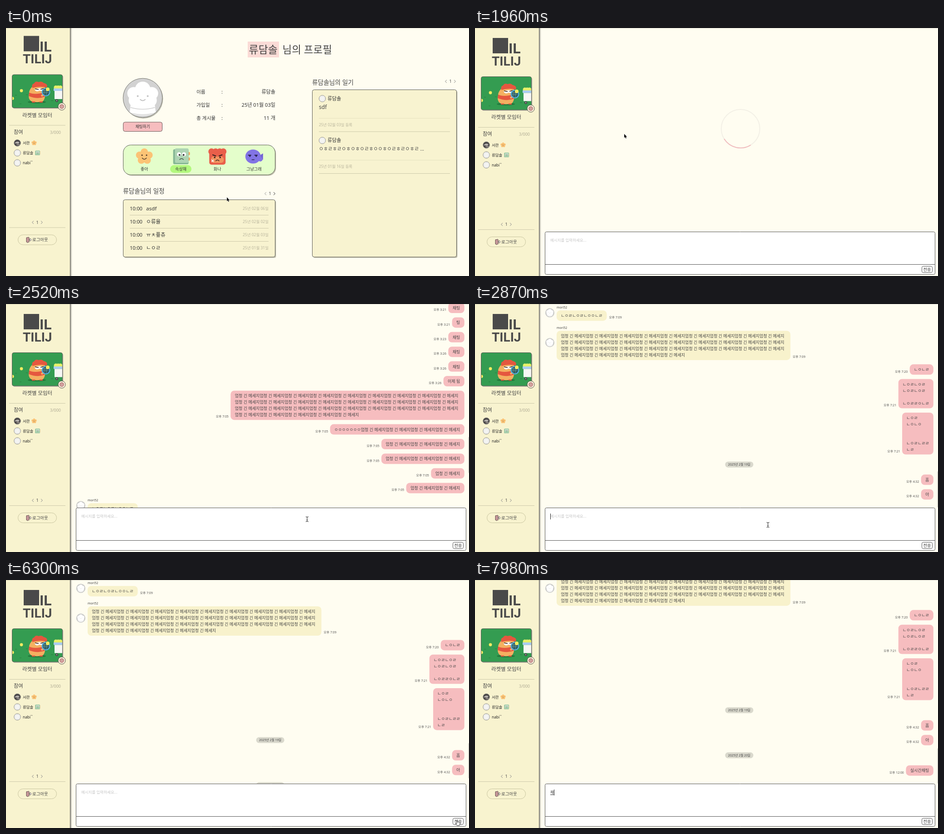
An HTML page with a canvas for the animation above (8000 ms loop, 1021 px wide and 548 px high).

```html
<!DOCTYPE html>
<html lang="ko">
<head>
<meta charset="utf-8">
<title>프로필과 채팅</title>
<style>
html, body { margin: 0; width: 100%; height: 100%; overflow: hidden; background: #fffdf1; }
canvas { display: block; }
</style>
</head>
<body>
<canvas id="stage" width="1021" height="548"></canvas>
<script>
const ctx = document.getElementById('stage').getContext('2d');
const LOOP = 8000, STEP = 70;
const FONT = '"Noto Sans","Noto Sans CJK KR","Noto Sans KR",sans-serif';
const BG = '#fffdf1', CREAM = '#f8f3d0', PINK = '#f6bdbf', INK = '#444', DIM = '#b9b59c', RULE = '#cdc9aa';
const OWNER = '류담솔', FRIEND = '서란', GUEST = 'nabi``', WRITER = 'mori52';

// ---------- helpers ----------
function text(s, x, cy, size, color = INK, align = 'left', weight = 400) {
  ctx.font = `${weight} ${size}px ${FONT}`;
  ctx.textAlign = align;
  ctx.fillStyle = color;
  ctx.fillText(s, x, cy + size * 0.36);
}
function width(s, size) {
  ctx.font = `400 ${size}px ${FONT}`;
  return ctx.measureText(s).width;
}
function paint(fill, stroke, lw = 1) {
  if (fill) { ctx.fillStyle = fill; ctx.fill(); }
  if (stroke) { ctx.strokeStyle = stroke; ctx.lineWidth = lw; ctx.stroke(); }
}
function box(x, y, w, h, r, fill, stroke) {
  ctx.beginPath();
  ctx.roundRect(x, y, w, h, r);
  paint(fill, stroke);
}
function panel(x, y, w, h, r, fill) {
  box(x + 2, y + 2, w, h, r, '#c3c1ae');
  box(x, y, w, h, r, fill, '#5c5c58');
}
function oval(x, y, rx, ry, fill, stroke, lw) {
  ctx.beginPath();
  ctx.ellipse(x, y, rx, ry, 0, 0, Math.PI * 2);
  paint(fill, stroke, lw);
}
const disc = (x, y, r, fill, stroke, lw) => oval(x, y, r, r, fill, stroke, lw);
function shape(d, fill, stroke, lw = 1) {
  const p = new Path2D(d);
  if (fill) { ctx.fillStyle = fill; ctx.fill(p); }
  if (stroke) { ctx.strokeStyle = stroke; ctx.lineWidth = lw; ctx.stroke(p); }
}
function rule(x1, x2, y, color = RULE) {
  ctx.fillStyle = color;
  ctx.fillRect(x1, y - 0.5, x2 - x1, 1);
}
function at(x, y, k, draw) {
  ctx.save();
  ctx.translate(x, y);
  ctx.scale(k, k);
  draw();
  ctx.restore();
}
function pager(x, y, prev, next) {
  shape(`M${x - 8} ${y - 3.2}l-3.5 3.2l3.5 3.2`, null, prev);
  shape(`M${x + 8} ${y - 3.2}l3.5 3.2l-3.5 3.2`, null, next);
  text('1', x, y, 9, INK, 'center');
}
const easeInOut = p => 0.5 - 0.5 * Math.cos(Math.PI * Math.min(1, Math.max(0, p)));

// ---------- small illustrations ----------
function star() {
  for (let i = 0; i < 5; i++) {
    const a = -Math.PI / 2 + i * Math.PI * 0.4;
    disc(Math.cos(a) * 11, Math.sin(a) * 10, 8, '#fbc375');
  }
  disc(0, 0, 11, '#fbc375');
  disc(-5, -3, 1.6, '#4a3526');
  disc(5, -3, 1.6, '#4a3526');
  shape('M-5 3q5 6 10 0', null, '#4a3526', 1.3);
}
function book() {
  box(14, -10, 6, 7, 2, '#f2a55c');
  box(14, 2, 6, 7, 2, '#f2a55c');
  box(-17, -16, 34, 33, 3, '#86b795');
  box(-13, -18, 30, 32, 3, '#aed4b3');
  disc(-4, -5, 4.5, '#fff');
  disc(7, -5, 4.5, '#fff');
  disc(-3, -3.5, 2, '#333');
  disc(6, -3.5, 2, '#333');
  shape('M-3 7q4.5 -5 9 0', null, '#3d4b40', 1.4);
}
function angry() {
  for (const x of [-13, -4, 5, 13]) disc(x, -11, 7, '#e95f4a');
  box(-18, -12, 36, 30, 5, '#e95f4a');
  box(-14, 0, 28, 14, 6, '#f2935f');
  shape('M-11 -4l8 3M11 -4l-8 3', null, '#33241f', 2);
  disc(-6, 2, 1.8, '#33241f');
  disc(6, 2, 1.8, '#33241f');
  shape('M-4 10q4 -5 8 0', null, '#33241f', 1.4);
  shape('M-13 7l5 5m0 -5l-5 5', null, '#fff', 1.4);
}
function blob() {
  shape('M12 -2l8 -5v14l-8 -3z', '#7264d4');
  oval(-2, 0, 17, 15.5, '#8274e4');
  disc(14, 6, 5, '#8274e4');
  shape('M-13 -3h7M1 -3h7', null, '#2b2550', 2);
  disc(-9, -1, 1.8, '#2b2550');
  disc(5, -1, 1.8, '#2b2550');
  shape('M-5 7h6', null, '#2b2550', 1.4);
}
function chef(x, y, r) {
  at(x, y, r / 43.5, () => {
    ctx.save();
    ctx.beginPath();
    ctx.arc(0, 0, 43.5, 0, Math.PI * 2);
    ctx.clip();
    ctx.fillStyle = '#d2d2d2';
    ctx.fillRect(-44, -44, 88, 88);
    for (const [cx, cy, cr] of [[-20, -10, 14], [0, -19, 17], [20, -10, 14], [-15, 5, 16], [15, 5, 16], [0, 2, 20]])
      disc(cx, cy, cr, '#fff');
    shape('M-26 10L26 10L29 34Q0 44 -29 34Z', '#fff');
    shape('M-27 21Q0 29 27 21M-29 33Q0 41 29 33', null, '#d0d0d0', 1.5);
    disc(-11, -4, 2, '#c4c4c4');
    disc(11, -4, 2, '#c4c4c4');
    shape('M-6 3q6 6 12 0', null, '#c4c4c4', 2);
    ctx.restore();
  });
}
function blankFace(x, y) {
  disc(x, y, 7.2, '#fff', '#8b8b86');
  disc(x, y, 5.2, '#f4f4f2', '#dcdcdc', 0.8);
}
function clubPicture() {
  panel(13.5, 107.5, 111, 73.5, 4, '#349c51');
  ctx.save();
  ctx.beginPath();
  ctx.roundRect(14, 108, 110, 72.5, 3.5);
  ctx.clip();
  oval(68, 168, 20, 3, '#23793c');
  shape('M20 153h4M30 172h4M44 152h4M99 165h5', null, '#27823f', 1.2);
  disc(34, 143, 3.4, '#f4ec62');
  disc(14, 160, 3.6, '#f4ec62');
  // player
  shape('M58 134Q50 142 51 150Q48 160 55 166Q68 171 82 166Q88 158 85 148Q90 140 84 133Z', '#f4b061');
  shape('M51 147Q62 153 84 147L86 156Q70 163 50 155Z', '#e5573f');
  shape('M58 137Q56 128 62 127Q65 121 72 124Q79 121 83 126Q93 128 90 136Q75 132 58 137Z', '#e5573f');
  shape('M63 140Q73 135 84 139Q84 145 74 143Q66 147 63 140Z', '#fff');
  shape('M64 139l8 1.5M76 140l8 -2', null, '#33241f', 1.5);
  shape('M57 168h7M74 168h7', null, '#e5573f', 2.5);
  shape('M78 155l5 -4', null, '#f4b061', 4);
  // racket
  disc(88, 146, 8.5, '#2e5e63', '#54b4e8', 2.2);
  shape('M82 143h12M81 147h13M84 139v14M89 138v16', null, '#8fb4b0', 0.6);
  disc(92, 140, 4, '#f4ec62');
  // cart
  for (const x of [110, 115, 120]) disc(x, 136, 4.5, '#e6f06a');
  ctx.fillStyle = '#a9cdf3';
  ctx.fillRect(105, 138, 20, 5.5);
  ctx.fillStyle = '#f7f7f4';
  ctx.fillRect(107, 143.5, 17, 18);
  disc(112, 165, 3, '#454545');
  disc(112, 165, 1.1, '#d8d8d8');
  ctx.restore();
  disc(123, 178, 8, '#fdf3dc', '#55524a');
  disc(123, 178, 4.2, '#f0b9b6', '#9c6064', 1.3);
  disc(123, 178, 1.6, '#fdf3dc', '#9c6064', 1);
}

// ---------- sidebar ----------
function logo() {
  ctx.fillStyle = '#4a4a4a';
  ctx.fillRect(39, 22, 34, 34);
  ctx.textAlign = 'left';
  ctx.font = '700 32px Roboto,sans-serif';
  ctx.fillText('IL', 74, 56);
  ctx.font = '700 28px Roboto,sans-serif';
  ctx.fillText('TILIJ', 37, 82.5);
}
function sidebar(dy) {
  ctx.fillStyle = '#f8f3cf';
  ctx.fillRect(0, 0, 141, 548);
  const g = ctx.createLinearGradient(142, 0, 146, 0);
  g.addColorStop(0, '#a3a196');
  g.addColorStop(1, BG);
  ctx.fillStyle = g;
  ctx.fillRect(142, 0, 4, 548);
  ctx.fillStyle = '#5f5e58';
  ctx.fillRect(141, 0, 1, 548);
  ctx.save();
  ctx.translate(0, dy);
  logo();
  clubPicture();
  text('라켓별 모임터', 69, 197, 11.4, INK, 'center');
  rule(7, 131, 219.5);
  text('참여', 17, 234, 11.2);
  text('3/000', 121, 235, 9, '#b0ac94', 'right');
  disc(25, 258.5, 7.3, '#4b4848', '#8b8b86', 0.8);
  shape('M19 259q5 -6 11 -2l-3 3z', '#b9b5b2');
  oval(27, 262, 4, 2, '#85807c');
  blankFace(25, 280.5);
  blankFace(25, 302.5);
  [FRIEND, OWNER, GUEST].forEach((n, i) => text(n, 37, 258.5 + i * 22, 8.4, '#222', 'left', 500));
  at(62, 258.5, 0.31, star);
  at(69.5, 280.5, 0.3, book);
  pager(69, 434, '#888', '#888');
  rule(7, 131, 445.5);
  box(26.5, 461.5, 85, 22, 11, null, '#c9c5a0');
  box(45, 467.5, 6, 10, 0.5, '#f0a9ad', '#5a4a4a');
  shape('M50 466.5l-3 1.5v11l3 -1.5z', '#f6bdbf', '#5a4a4a', 0.8);
  shape('M51.5 471.5h2v-2l3 3l-3 3v-2h-2z', '#fff', '#5a4a4a', 0.8);
  text('로그아웃', 58, 472.5, 9.4);
  ctx.restore();
}

// ---------- profile ----------
function diary(y, body, size, date) {
  blankFace(697.5, y);
  text(OWNER, 709, y, 10.9, '#333');
  text(body, 690, y + 19, size);
  rule(690, 979, y + 43.5, '#e6e1c0');
  text(date + ' 등록', 690, y + 57.5, 8.4, DIM);
  rule(690, 979, y + 73);
}
function profile(hover) {
  ctx.fillStyle = '#fbdbd6';
  ctx.fillRect(533, 30, 69, 35);
  text(OWNER, 535.5, 47.5, 23);
  text('님의 프로필', 609.5, 47.5, 22.5);

  disc(303, 156.5, 43.5, '#bdbcb0');
  chef(301.5, 154.5, 43.5);
  disc(301.5, 154.5, 43.3, null, '#77776f');
  box(258.5, 208, 86, 20.5, 4, hover ? '#f3adaf' : PINK, '#6a5a5a');
  text('채팅하기', 301.5, 218.2, 8.7, '#333', 'center');

  [['이름', OWNER], ['가입일', '25년 01월 03일'], ['총 게시물', '11 개']].forEach(([k, v], i) => {
    const y = 141 + i * 29;
    text(k, 420, y, 10.7, '#333', 'left', 500);
    text(':', 476.5, y, 10.7, '#333', 'center', 500);
    text(v, 594, y, 11.1, '#333', 'right', 500);
  });

  panel(258.5, 258.5, 335, 66, 17, '#e4fecb');
  box(362, 303, 47, 17, 8.5, '#b3f87e');
  [[star, '좋아'], [book, '속상해'], [angry, '화나'], [blob, '그냥그래']].forEach(([icon, name], i) => {
    const x = 305 + i * 80.6;
    at(x, 284, 1, icon);
    text(name, x, 311.5, 9.1, '#333', 'center');
  });

  text(OWNER + '님의 일정', 258, 360.5, 13.7);
  pager(582, 366, '#999', '#333');
  panel(258.5, 379.5, 335, 126.5, 4, CREAM);
  [['asdf', '02월 06일'], ['ㅇ류율', '02월 02일'], ['ㅠㅊ픂츄', '02월 03일'], ['ㄴㅇㄹ', '01월 31일']].forEach(([s, d], i) => {
    const y = 399 + i * 29;
    text('10:00', 273, y, 10.9, '#333');
    text(s, 309, y, 11.6, '#333');
    text('25년 ' + d, 579, y, 8.5, DIM, 'right');
    if (i < 3) rule(273, 579, y + 14.5);
  });

  text(OWNER + '님의 일기', 675, 120.5, 13.7);
  pager(980, 118, '#888', '#888');
  panel(675.5, 136.5, 318, 369.5, 4, CREAM);
  diary(156, 'sdf', 12, '25년 02월 03일');
  diary(248.5, 'ㅇㅎㄹㅎㄹㅇㅎㅇㅎㅇㄹㅎㅇㅇㅎㅇㄹㅎㄹㅇㅎㄹ ...', 10.9, '25년 01월 16일');
}

// ---------- chat ----------
const LINE = 13.93, GAP = 9.4, MSG = 9.07, VIEW = 450, HEIGHT = 2517, GROWTH = 67, MAX_WIDTH = 515.5;
const long = n => '엄청 긴 메세지'.repeat(n);
const essay = [long(9), long(9), long(9), long(5)].join('\n');
const me = (body, time) => ({ kind: 'me', body, time });
const you = (body, time) => ({ kind: 'you', body, time });
const day = body => ({ kind: 'day', body });
const chat = [
  ...Array.from({ length: 50 }, () => me('채팅', '3:21')),
  me('팅', '3:21'), me('채팅', '3:23'), me('채팅', '3:26'), me('채팅', '3:26'), me('이제 됨', '3:26'),
  me(essay, '7:05'), me('ㅇㅇㅇㅇㅇㅇㅇ' + long(4), '7:05'), me(long(3), '7:05'), me(long(3), '7:05'),
  me(long(1), '7:05'), me(long(2), '7:05'),
  you('ㄴㅇㄹㄴㅇㄹㄴㅇㅇㄴㄹ', '7:09'), you(essay, '7:09'),
  me('ㄴㅇㄴㄹ', '7:20'), me('ㄴㅇㄹㄴㅇㄹ\nㄴㅇㄹㄴㅇㄹ\n\nㄴㅇㄹㄹㅇㄴㄹ', '7:21'),
  me('ㄴㅇㄹ\nㄴㅇㄴㅇ\n\n\nㄴㅇㄹㄴㄹㄹ\nㄴㄹ', '7:21'),
  day('2025년 2월 19일'), me('흠', '4:32'), me('아', '4:32'),
  day('2025년 2월 20일'), me('실시간채팅', '12:00')
];
let flow = 0;
for (const m of chat) {
  m.lines = m.body.split('\n');
  const extra = m.kind === 'day' ? 6.2 : 0;
  m.h = m.kind === 'day' ? 13 : 9.07 + LINE * m.lines.length;
  m.top = flow + extra + (m.kind === 'you' ? 12.6 : 0);
  flow = m.top + m.h + extra + GAP;
}
const lastOld = chat[chat.length - 3];
const shift = 432.2 - lastOld.top - lastOld.h;
for (const m of chat) m.top += shift;

function bubble(m, y) {
  if (m.kind === 'day') {
    const w = width(m.body, 6.75) + 13;
    box(582.7 - w / 2, y, w, m.h, 6.5, '#dad9cd');
    text(m.body, 582.7, y + 6.6, 6.75, '#444', 'center');
    return;
  }
  const mine = m.kind === 'me';
  // wrapped text fills the widest bubble
  const w = m.body === essay ? MAX_WIDTH : Math.max(...m.lines.map(s => width(s, MSG))) + 18.8;
  const x = mine ? 1010.8 - w : 180;
  box(x, y, w, m.h, 8, mine ? PINK : '#f8f2cc');
  m.lines.forEach((s, i) => text(s, x + 9.4, y + 11.7 + i * LINE, MSG));
  text('오후 ' + m.time, mine ? x - 4.5 : x + w + 5, y + m.h - 7.2, 6.9, '#555', mine ? 'right' : 'left');
  if (!mine) {
    const cy = y + m.h / 2 - 6.3;
    text(WRITER, 180, y - 7, 6.9, '#444');
    chef(165, cy, 10);
    disc(165, cy, 9.2, null, '#cbcbc9', 1.6);
  }
}
function chatList(t) {
  const sent = t >= 6230;
  const offset = 2067 * (1 - easeInOut((t - 2310) / 300)) - GROWTH * easeInOut((t - 6277) / 300);
  ctx.save();
  ctx.beginPath();
  ctx.rect(146, 0, 875, VIEW + 1);
  ctx.clip();
  chat.slice(0, sent ? chat.length : -2).forEach(m => {
    const y = m.top + offset;
    if (y < VIEW + 20 && y + m.h > -20) bubble(m, y);
  });
  const h = HEIGHT + (sent ? GROWTH : 0), k = VIEW / h;
  box(1019.5, (HEIGHT - VIEW - offset) * k, 4, VIEW * k, 2, '#d2d0c6');
  ctx.restore();
}
const typing = [
  [3500, 'ㅅ'], [3570, '시'], [3640, '실'], [3850, '싨'], [3920, '실시'], [3990, '실식'], [4130, '실시가'],
  [4200, '실시간'], [4410, '실시간채'], [4620, '실시간챝'], [4690, '실시간채티'], [4830, '실시간채팅'],
  [6230, ''], [7980, '채']
];
const caretOn = [[2870, 3290], [3500, 5250], [5740, 6160], [6930, 7490], [7980, LOOP]];
function composer(t) {
  box(154.5, 450.5, 860, 94, 3, '#fff', '#555');
  rule(155, 1014, 522.5, '#555');
  box(985.5, 526.5, 23, 14, 3, '#fff', '#555');
  text('전송', 997, 534, 9.2, '#333', 'center');
  const typed = typing.reduce((s, [from, v]) => t >= from ? v : s, '');
  const size = 8.4, end = 166 + width(typed, size);
  if (typed) {
    text(typed, 166, 469, size, '#333');
    if (t < 6160 || t >= 7980) {
      const w = width(typed.slice(-1), size);
      ctx.fillStyle = '#333';
      ctx.fillRect(end - w, 474, w, 1);
    }
  } else {
    text('메시지를 입력하세요...', 166, 469, 8.5, '#c6c6c6');
  }
  if (caretOn.some(([a, b]) => t >= a && t < b)) {
    ctx.fillStyle = '#222';
    ctx.fillRect(Math.round(end), 463, 1, 13);
  }
}
function spinner(t) {
  const mid = (103 + (t - 1960) * 0.36) * Math.PI / 180;
  disc(585.5, 222.5, 42.5, null, '#f3f0e6', 2);
  ctx.beginPath();
  ctx.arc(585.5, 222.5, 42.5, mid - Math.PI / 4, mid + Math.PI / 4);
  paint(null, '#f1bdbf', 2);
}

// ---------- pointer ----------
const path = [
  [0, 487, 374], [490, 368, 224], [560, 368, 224], [1120, 322, 219], [1540, 322, 219], [1960, 329, 234],
  [2310, 540, 385], [2520, 664, 475.5], [2870, 646, 488], [5180, 646, 488], [6020, 984, 531],
  [6090, 995, 531], [6510, 995, 531], [6860, 859, 481], [LOOP, 859, 481]
];
function pointerAt(t) {
  const i = path.findIndex(p => p[0] > t);
  const [t0, x0, y0] = path[i - 1], [t1, x1, y1] = path[i];
  const p = (t - t0) / (t1 - t0);
  return [x0 + (x1 - x0) * p, y0 + (y1 - y0) * p];
}
const inside = (x, y, l, t, r, b) => x >= l && x <= r && y >= t && y <= b;
function arrow() {
  const d = 'M0 0V8.6L2 6.9L3.4 9.9L4.9 9.2L3.6 6.4H6.2Z';
  shape(d, null, '#fff', 0.8);
  shape(d, '#111');
}
function hand() {
  shape('M-.9 .3Q0 -1 .9 .3V4Q2 3.2 2.8 4.2Q4 3.6 4.5 4.7Q6 4.3 6 5.8V8Q5.6 9.6 4.8 11.6H-.4Q-1.6 9.6 -3.4 7.4Q-3.4 5.8 -.9 7Z', '#fff', '#222', 0.9);
}
function beam() {
  shape('M-3 -5.5Q0 -5.5 0 -4Q0 -5.5 3 -5.5M0 -4.5V4.5M-3 5.5Q0 5.5 0 4Q0 5.5 3 5.5M-1.2 1.5H1.2', null, '#222', 1);
}

function draw(t) {
  const inChat = t >= 1540;
  const [x, y] = pointerAt(t);
  const onButton = !inChat && inside(x, y, 258, 208, 345, 229);
  ctx.fillStyle = BG;
  ctx.fillRect(0, 0, 1021, 548);
  sidebar(inChat ? 0 : -4.5);
  if (inChat) {
    if (t < 2380) spinner(t);
    else chatList(t);
    composer(t);
  } else {
    profile(onButton);
  }
  ctx.fillStyle = 'rgba(90,90,80,.22)';
  ctx.fillRect(0, 0, 1021, 1);
  if (t < 3500 || (t >= 5250 && t < 7980)) {
    const onSend = inChat && inside(x, y, 985, 527, 1009, 541);
    const onField = inChat && inside(x, y, 155, 451, 1015, 522);
    at(x, y, 1, onButton || onSend ? hand : onField ? beam : arrow);
  }
}

const start = performance.now();
function tick() {
  const t = (performance.now() - start) % LOOP;
  draw(Math.floor(t / STEP) * STEP);
  requestAnimationFrame(tick);
}
tick();
</script>
</body>
</html>
```
